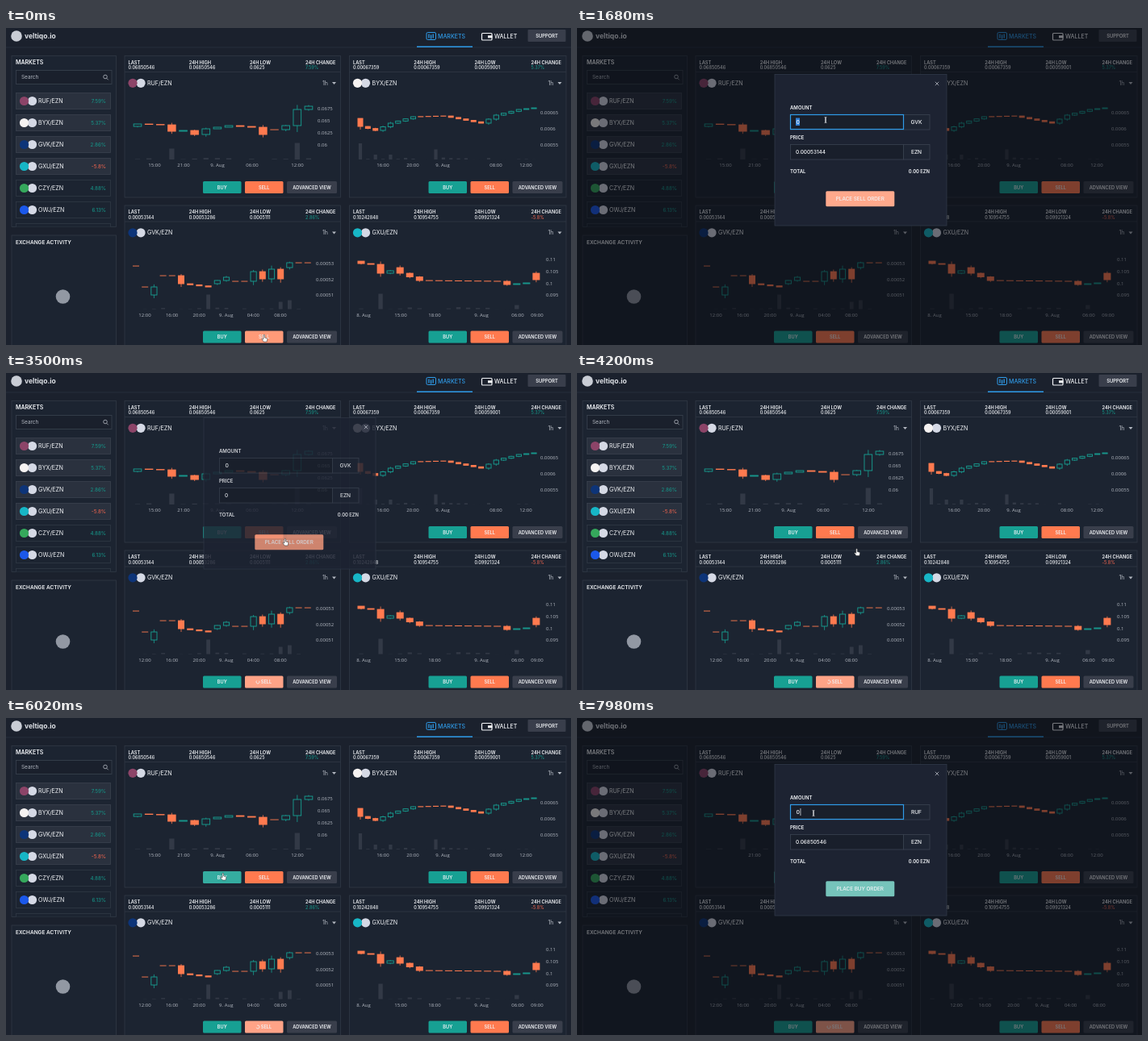
Animation, 700 px wide and 393 px high, one loop 8 s. Source, as an HTML page:

```html
<!DOCTYPE html>
<html lang="en">
<head>
<meta charset="utf-8">
<title>Markets</title>
<style>
  html, body { margin: 0; width: 100%; height: 100%; overflow: hidden; background: #1b212d; }
  svg { display: block; width: 100%; height: 100%; font-family: Inter, "Open Sans", sans-serif; }
  .axis { font-family: "Open Sans", "Noto Sans", sans-serif; }
</style>
</head>
<body>
<svg id="stage" viewBox="0 0 700 393"></svg>
<script>
const LOOP = 8000, TICK = 140;
const C = {
  page: '#1b212d', panel: '#1c2431', line: '#303845', row: '#2a313e', grey: '#393e4b',
  white: '#f2f4f7', soft: '#b4b9c2', teal: '#17a093', up: '#178f84', orange: '#ff7a4f',
  down: '#e0604d', blue: '#2f9be8', volume: '#323946'
};
const BASE = 'EZN';
const market = (name, change, colour) => ({ name, change, colour });
const markets = [
  market('RUF', '7.59%', '#8c4468'), market('BYX', '5.37%', '#f6f3f2'),
  market('GVK', '2.86%', '#0d3478'), market('GXU', '-5.8%', '#17b6c6'),
  market('CZY', '4.88%', '#35a85c'), market('OWJ', '6.13%', '#1b58ea'),
  market('LUQ', '3.12%', '#2c64d8')
];

// trend: [candle index, height] key points; two points at one index make a gap
const charts = [
  {
    stats: ['0.06850546', '0.06850546', '0.0625'],
    x0: 163, pitch: 14.13, body: 10.5, count: 16, peaks: { 3: 13.5, 14: 20.5 },
    trend: [[0, 122], [1, 119], [3, 120], [4, 128], [5, 127], [6, 132], [7, 125], [9, 121],
      [11, 123], [12, 132], [12, 126], [13, 126], [14, 121], [15, 101], [16, 97]],
    price: { x: 386, y: 100, gap: 15, top: .0675, drop: .0025, count: 4 },
    times: [['15:00', 184], ['21:00', 220], ['9. Aug', 262], ['06:00', 305], ['12:00', 361]]
  },
  {
    stats: ['0.00067359', '0.00067359', '0.00059001'],
    x0: 439, pitch: 9.35, body: 7, count: 24, peaks: { 0: 20, 2: 6, 4: 6, 10: 12.5 },
    trend: [[0, 112], [1, 122], [3, 127], [5, 118], [8, 110], [12, 109], [17, 118], [19, 108], [22, 101], [24, 99]],
    price: { x: 662, y: 105, gap: 20, top: .00065, drop: .00005, count: 3 },
    times: [['16:00', 467], ['20:00', 504], ['9. Aug', 541], ['08:00', 607], ['12:00', 644]]
  },
  {
    stats: ['0.00053144', '0.00053286', '0.0005111'],
    x0: 161, pitch: 11.2, body: 8, count: 20, peaks: { 8: 18, 16: 9, 17: 11 },
    trend: [[0, 295], [1, 295], [1, 321], [2, 321], [2, 331], [3, 321], [3, 307], [5, 307], [6, 317],
      [9, 321], [9, 317], [11, 309], [11, 314], [13, 314], [14, 302], [15, 311], [16, 299], [17, 311], [17, 297], [18, 291], [20, 291]],
    price: { x: 384, y: 292, gap: 19.5, top: .00053, drop: .00001, count: 3 },
    times: hours(12, 172, 33.6)
  },
  {
    stats: ['0.10242848', '0.10954755', '0.09921324'],
    x0: 440, pitch: 12.05, body: 9, count: 19, peaks: { 2: 19, 16: 5 },
    trend: [[0, 289], [1, 292], [2, 293], [3, 304], [4, 301], [4, 297], [5, 304], [7, 313], [15, 314],
      [16, 318], [18, 316], [18, 304], [19, 312]],
    price: { x: 669, y: 287, gap: 14.7, top: .11, drop: .005, count: 4 },
    times: [['8. Aug', 443], ['15:00', 489], ['18:00', 531], ['9. Aug', 589], ['06:00', 634], ['09:00', 658]],
    later: hours(12, 470, 35.4)
  }
];
charts[0].later = charts[0].times.slice(1);

// Six labels, four hours apart, with the date at midnight
function hours(first, x, gap) {
  return Array.from({ length: 6 }, (_, i) => {
    const h = (first + i * 4) % 24;
    return [h ? `${String(h).padStart(2, '0')}:00` : '9. Aug', x + i * gap];
  });
}

// Shape helpers returning SVG markup
const attrs = o => Object.entries(o).map(([k, v]) => ` ${k}="${v}"`).join('');
const rect = (x, y, width, height, fill, more = {}) =>
  `<rect${attrs({ x, y, width, height, fill, ...more })}/>`;
const text = (x, y, s, size, more = {}) =>
  `<text${attrs({ x, y, 'font-size': size, fill: C.white, 'font-weight': 500, ...more })}>${s}</text>`;
const circle = (cx, cy, r, fill, more = {}) => `<circle${attrs({ cx, cy, r, fill, ...more })}/>`;
const path = (d, stroke, more = {}) => `<path${attrs({ d, stroke, fill: 'none', 'stroke-width': .8, ...more })}/>`;
const group = (id, body) => `<g id="${id}">${body}</g>`;
const times = (n, f) => Array.from({ length: n }, (_, i) => f(i)).join('');
const mid = { 'text-anchor': 'middle' }, end = { 'text-anchor': 'end' };
const light = { 'font-weight': 400 }, bold = { 'font-weight': 600 };
const axisStyle = { ...light, fill: C.soft, class: 'axis' };
const box = (x, y, w, h, fill = C.panel, stroke = C.line) =>
  rect(x + .5, y + .5, w - 1, h - 1, fill, { stroke, 'stroke-width': .8 });
const coins = (x, y, colour) => circle(x + 10, y, 5.6, '#d5d9e5') + circle(x, y, 5.6, colour);
const changeColour = s => s[0] === '-' ? C.down : C.up;
const button = (x, y, w, label, fill, id) =>
  rect(x, y, w, 15, fill, { rx: 1.5, id }) +
  text(x + w / 2, y + 9.7, label, 5.6, { ...mid, ...bold, id: id + 'Text' });

const ramp = (t, a, b) => Math.min(1, Math.max(0, (t - a) / (b - a)));
const noise = n => { const v = Math.sin(n * 127.1) * 43758.5; return v - Math.floor(v); };

function header() {
  return path('M0 24H700', '#2a323f') + circle(13, 10, 6.8, '#c9cdd5') +
    text(23, 13, 'veltiqo.io', 8.5, { 'font-weight': 700, fill: '#dfe2e7' }) +
    rect(521, 5.5, 11.5, 9, 'none', { rx: 1.5, stroke: C.blue }) +
    times(3, i => rect(523.3 + i * 2.6, 7.5 + i % 2, 1.3, 5, C.blue)) +
    text(535, 12.8, 'MARKETS', 7, { fill: C.blue }) + rect(509, 22.5, 69, 1.5, C.blue) +
    rect(589.5, 6.5, 12.5, 8.5, 'none', { rx: 1, stroke: C.white, 'stroke-width': 1.2 }) +
    rect(597, 9.3, 5.5, 3, C.white) + text(605, 12.8, 'WALLET', 7) +
    rect(646.5, 2, 47, 15, C.grey, { rx: 1 }) +
    text(670, 11.7, 'SUPPORT', 5.8, { ...mid, ...bold });
}

function sidebar() {
  const rows = markets.map(({ name, change, colour }, i) => {
    const y = 90.5 + i * 27;
    return box(12, y - 10.5, 118, 21, i < 4 ? C.row : C.panel, i < 4 ? '#3a414e' : C.line) +
      coins(22.5, y, colour) + text(40, y + 2.5, `${name}/${BASE}`, 7.1, light) +
      text(124, y + 2.3, change, 6.2, { ...end, fill: changeColour(change) });
  }).join('');
  return box(6.5, 34, 130.5, 213) + text(12, 45.4, 'MARKETS', 7, bold) +
    box(12, 52, 119.5, 18, '#1a202c', '#3a424f') +
    text(19, 63.3, 'Search', 6.4, { ...light, fill: C.soft }) +
    circle(123, 60.5, 2.3, 'none', { stroke: C.soft, 'stroke-width': .8 }) + path('M124.7 62.3l2 2', C.soft) +
    '<clipPath id="list"><rect x="8" y="75" width="128" height="171.5"/></clipPath>' +
    `<g clip-path="url(#list)">${rows}</g>` +
    box(6.5, 256.5, 130.5, 140) + text(12, 268.3, 'EXCHANGE ACTIVITY', 6.5, bold) +
    circle(70.5, 333, 8.8, '#9298a3');
}

function trendAt(trend, i) {
  const k = Math.max(1, trend.findIndex(p => p[0] >= i));
  const [a, ya] = trend[k - 1], [b, yb] = trend[k];
  return ya + (yb - ya) * ramp(i, a, b);
}

// Each candle spans one step of the trend: filled when falling, hollow when rising
function candles({ x0, pitch, body, count, trend, peaks }, base) {
  return times(count, i => {
    const x = x0 + i * pitch;
    const open = trendAt(trend, i + .001), close = trendAt(trend, i + .999);
    const top = Math.min(open, close), h = Math.abs(close - open);
    const rising = close < open - .8, colour = rising ? C.teal : C.orange;
    const tall = peaks[i] || noise(i + x0) ** 3 * 2.5;
    const wick = h > 2 ? h * .4 : 0;
    return rect(x - body * .3, base - tall, body * .6, tall, C.volume) +
      path(`M${x} ${top - wick * noise(i)}V${top + h + wick}`, colour) +
      (rising
        ? rect(x - body / 2 + .4, top, body - .8, h, C.panel, { stroke: C.teal, 'stroke-width': .9 })
        : rect(x - body / 2, top - .4, body, h + .9, C.orange));
  });
}

const timeAxis = (y, labels) => labels.map(([s, x]) => text(x, y, s, 6, { ...mid, ...axisStyle })).join('');

function panel(chart, i) {
  const x = 147 + i % 2 * 278.5, y = 34 + (i >> 1) * 185.5, width = 268.5 + i % 2;
  const right = x + width, { name, change, colour } = markets[i], { price, later } = chart;
  const stats = ['LAST', '24H HIGH', '24H LOW', '24H CHANGE'].map((label, k) => {
    const sx = k === 3 ? right - 44.5 : x + 4.5 + k * 75.2;
    return text(sx, y + 10.8, label, 5.7, bold) +
      text(sx, y + 17.2, [...chart.stats, change][k], 5.5, k === 3 ? { fill: changeColour(change) } : {});
  }).join('');
  const ty = y + 138.3;
  return box(x - .5, y, width, 176.5) + path(`M${x} ${y + 20.5}h${width - 1}`, C.line) + stats +
    coins(x + 10, y + 34.3, colour) + text(x + 28, y + 36.8, `${name}/${BASE}`, 7.1, light) +
    text(right - 23.5, y + 36.8, '1h', 7, { ...light, fill: C.soft }) +
    `<path d="M${right - 11.5} ${y + 33}h5l-2.5 3z" fill="${C.soft}"/>` +
    candles(chart, y + 129) +
    times(price.count, k =>
      text(price.x, price.y + k * price.gap + 2.1, +(price.top - k * price.drop).toFixed(5), 6, axisStyle)) +
    group('early' + i, timeAxis(ty, chart.times)) + (later ? group('late' + i, timeAxis(ty, later)) : '') +
    button(right - 171.5, y + 156, 47.5, 'BUY', C.teal, 'buy' + i) +
    button(right - 119.5, y + 156, 47.5, 'SELL', C.orange, 'sell' + i) +
    button(right - 67.5, y + 156, 62, 'ADVANCED VIEW', C.grey, 'view' + i);
}

function modal() {
  const field = y =>
    box(264, y, 141, 19.5, '#191f2b', '#3a4250') + box(404, y, 33.5, 19.5, '#1e2533', '#3a4250');
  return rect(245, 57.5, 213, 187.5, '#1d2332', { stroke: '#303847', 'stroke-width': .8 }) +
    path('M443.8 66.8l4.4 4.4m0-4.4l-4.4 4.4', C.soft) +
    text(264, 101, 'AMOUNT', 6, bold) + field(107) +
    rect(264.5, 107.5, 140, 18, 'none', { id: 'focus', stroke: C.blue, 'stroke-width': 1.2 }) +
    rect(271, 111.5, 5, 9.5, '#2f7fd6', { id: 'selection' }) +
    text(271.5, 119, '0', 6.8, { id: 'amount' }) + rect(277, 112, .7, 9, C.white, { id: 'caret' }) +
    text(420.5, 119, '', 6.6, { ...mid, id: 'unit' }) +
    text(264, 138, 'PRICE', 6, bold) + field(144) +
    text(271, 156, '', 6.4, { id: 'price' }) + text(420.5, 156, BASE, 6.6, mid) +
    text(264, 180, 'TOTAL', 6, bold) + text(437, 180, '', 5.8, { ...end, ...bold, id: 'total' }) +
    rect(308.3, 202.3, 85, 19, C.orange, { id: 'place', rx: 1.5 }) +
    text(350.8, 214, '', 6.3, { ...mid, id: 'placeText' });
}

const stage = document.getElementById('stage');
stage.innerHTML = rect(0, 0, 700, 393, C.page) + header() + sidebar() + charts.map(panel).join('') +
  path('M314 383a2 2 0 1 1-2-2', C.white, { id: 'spinner' }) +
  rect(0, 0, 700, 393, '#080b10', { id: 'dim' }) + group('modal', modal()) +
  group('cursor',
    path('M-1-4a.8.8 0 0 1 1.6 0V-1l2.6.7q.8.3.6 1.2L3.2 4H-.8L-3 .8q0-1 1-.6l1 .6Z', '#222',
      { id: 'hand', fill: '#fff', 'stroke-width': .5 }) +
    path('M-1.3-3.5Q0-3.5 0-2.5V2.5Q0 3.5-1.3 3.5M1.3-3.5Q0-3.5 0-2.5V2.5Q0 3.5 1.3 3.5', C.white, { id: 'beam' }));

const el = {};
stage.querySelectorAll('[id]').forEach(e => { el[e.id] = e; });
const set = (id, o) => { for (const k in o) el[id].setAttribute(k, o[k]); };
const show = (id, on) => set(id, { visibility: on ? 'inherit' : 'hidden' });
const within = (t, a, b) => t >= a && t < b;

// Moves of the pointer: [start, end, x, y]
const moves = [[560, 1400, 308, 114], [2380, 2940, 346, 210], [3640, 4480, 347, 227],
  [5040, 5880, 269, 197], [6020, 6860, 266, 196], [7140, 7840, 293, 118]];

function pointerAt(t) {
  return moves.reduce(([px, py], [a, b, x, y]) => {
    const k = ramp(t, a, b), e = k * k * (3 - 2 * k);
    return [px + (x - px) * e, py + (y - py) * e];
  }, [320, 385]);
}

function draw(t) {
  const selling = t < 5000, closed = within(t, 3450, 5000), pair = selling ? 2 : 0;
  const dim = ramp(t, 280, 560) * (1 - ramp(t, 3300, 3480)) + ramp(t, 6720, 6860);
  set('dim', { opacity: dim * .52 });

  const fade = ramp(t, 560, 840) * (1 - ramp(t, 3450, 3780)) + ramp(t, 6860, 7140);
  set('modal', { opacity: fade, transform: `translate(0 ${-13 * (1 - fade)})` });
  show('modal', fade > 0);

  const typed = closed || !selling ? '0' : '100'.slice(0, Math.floor(ramp(t, 1820, 2380) * 3)) || '0';
  el.amount.textContent = typed;
  el.unit.textContent = markets[pair].name;
  el.price.textContent = closed ? '0' : charts[pair].stats[0];
  el.total.textContent = `${(typed * charts[pair].stats[0]).toFixed(2)} ${BASE}`;
  el.placeText.textContent = `PLACE ${selling ? 'SELL' : 'BUY'} ORDER`;
  const idle = selling ? '#ffa98c' : '#76c4bb';
  set('place', { fill: closed ? '#ef967a' : typed > 0 ? C.orange : idle });

  const focused = within(t, 1400, 2940) || t >= 7700, selected = within(t, 1540, 1820);
  show('focus', focused);
  show('selection', selected);
  show('caret', focused && !selected);
  set('caret', { x: 272.3 + typed.length * 4.3 });

  const loading = t >= 3360;
  show('spinner', loading);
  set('spinner', { transform: `rotate(${t * .4 % 360} 312 383)` });
  set('sell2', { fill: loading ? '#ffa387' : t < 560 ? '#ff9a78' : C.orange });
  set('sell2Text', { x: loading ? 322.5 : 319.7 });
  set('buy0', { fill: t >= 5800 ? '#35aca0' : C.teal });

  charts.forEach(({ later }, i) => {
    if (!later) return;
    show('early' + i, t < 7420);
    show('late' + i, t >= 7420);
  });

  const beam = within(t, 1300, 2600) || t >= 7600;
  set('cursor', { transform: `translate(${pointerAt(t).join(' ')})` });
  show('beam', beam);
  show('hand', !beam);
}

function frame(now) {
  const t = now % LOOP;
  draw(t - t % TICK);
  requestAnimationFrame(frame);
}
requestAnimationFrame(frame);
</script>
</body>
</html>
```
